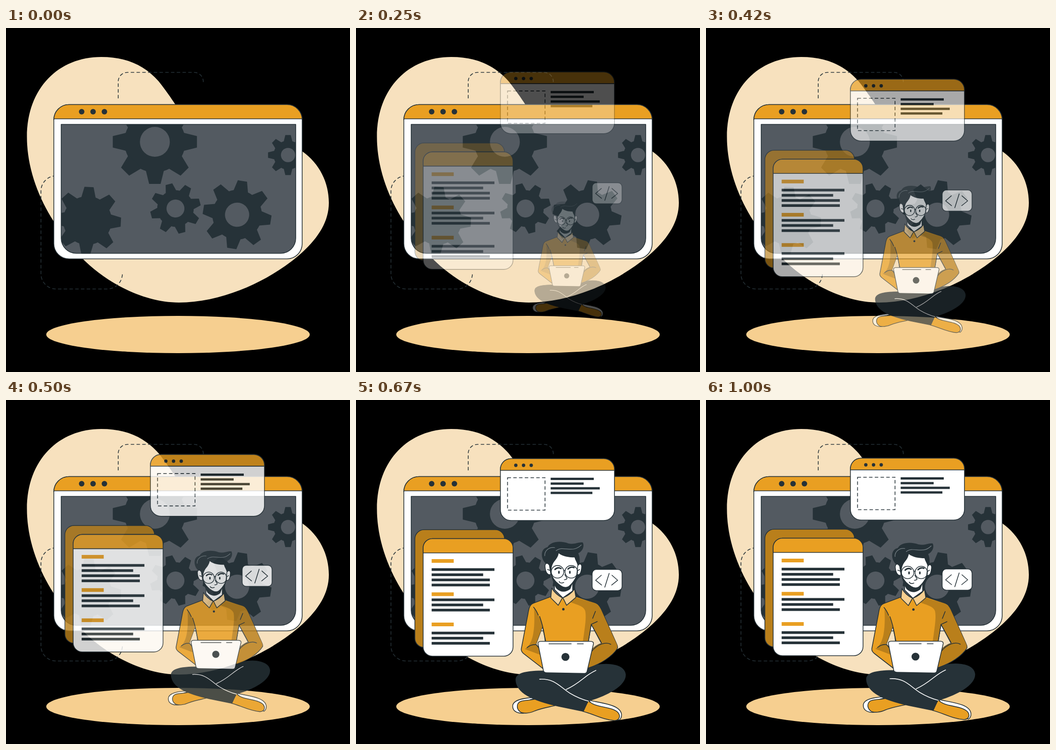
Recreate the animation shown at these times as an HTML page. Size 748 by 748 pixels, loop 1040 ms.

```html
<!DOCTYPE html>
<html lang="en">
<head>
<meta charset="utf-8">
<title>Developer at work</title>
<style>
  html, body { margin: 0; width: 100%; height: 100%; overflow: hidden; background: #000; }
  svg { display: block; width: 100%; height: 100%; }
  .line { fill: none; stroke: #263238; stroke-width: 1.6; stroke-linecap: round; stroke-linejoin: round; }
  .edge { stroke: #263238; stroke-width: 1.6; stroke-linejoin: round; }
  .dash { fill: none; stroke: #263238; stroke-width: 1.6; stroke-dasharray: 7.5 5; }
  .dark { fill: #263238; }
  .white { fill: #fff; }
  .orange { fill: #e99f22; }
  .brown { fill: #b97f1b; }
  .cream { fill: #f6cf90; }
  .light { fill: none; stroke: #fff; stroke-width: 1.6; stroke-linecap: round; }
</style>
</head>
<body>
<svg viewBox="0 0 748 748">
  <clipPath id="screen"><path d="M120 209.5H630V457a33 33 0 0 1-33 33.8H153a33 33 0 0 1-33-33.8Z"/></clipPath>

  <path fill="#f7e1be" d="M207 63C262 63 302 82 332 116C348 136 358 151 368 166C430 240 560 205 644 268C682 295 702 336 702 380C702 420 680 455 644 488C575 550 470 597 376 597C300 597 220 555 168 503C145 480 122 452 104 421C68 365 45.5 300 45.5 237C45.5 130 115 63 207 63Z"/>
  <ellipse class="cream" cx="374" cy="666.5" rx="286.5" ry="40.5"/>
  <path class="dash" d="M244 153V116a20 20 0 0 1 20-19.5H409a20 20 0 0 1 20 20V118"/>
  <path class="dash" d="M109 321.5a33 33 0 0 0-33 33V535a33 33 0 0 0 33 32.5H220a33 33 0 0 0 33-33.5"/>
  <g id="main"></g>
  <g id="panels"></g>

  <g id="man">
    <!-- shoes -->
    <path class="white edge" d="M401 645C368 645 342 650 342 664C342 676 354 680 366 679L380 650Z"/>
    <path class="orange edge" d="M402 644C390 652 372 650 361 653C350 656 349 669 358 676C364 681 380 679 390 674C405 668 420 666 436 662Z"/>
    <path class="white edge" d="M505 651C530 657 573 660 576 681Q577 689 571 694L530 680Z"/>
    <path class="orange edge" d="M505 652C518 668 552 663 568 677C575 685 572 694 561 695C536 693 516 681 493 675Z"/>
    <!-- legs -->
    <path class="dark edge" d="M412 588C375 588 349 592 349 607C350 636 386 652 440 664L494 675L504 653C545 641 585 620 584.5 596C582 576 552 570 520 576L495 586Z"/>
    <path class="light" d="M400 606C432 604 443 622 465 636C480 645 493 650 505 653M457 628C488 614 498 597 521 587"/>

    <!-- sweater, with openings beside the torso -->
    <path class="orange edge" fill-rule="evenodd" d="M425 428L388 442C379 445 377 452 375 465L360.5 541Q360 547 367 552L407 583H500C532 574 557 556 567.5 539Q568 535 566 531L532 455C527 445 524 443 517 441L478 428Z M406 493L392 531L402 542L413 524Z M511 488L533 529Q520 533 509 546L505 524Z"/>
    <path class="brown" d="M477 430L518 442Q527 445 532 456L566 531Q568 536 566 540C555 556 530 573 501 582L509 546Q520 533 533 529L511 488L505 525H493C497 495 501 475 498 459C494 448 480 446 465 440Z"/>
    <path class="brown" d="M388 451Q401 470 406 493L392 531L402 545L405 555L368 541C392 528 389 476 388 451Z"/>
    <path class="line" d="M387 451Q393 458 397 468M400 471Q409 496 412 525M373 538Q383 530 393 532L401 542M520 460L514 475M505 524L511 488L524 482M512 546C525 530 543 525 553 531M511 488L533 528"/>

    <!-- neck and collar -->
    <path class="white edge" d="M432 401V413L450 431L471 416V395Z"/>
    <path class="dark" d="M421 370C427 392 431 403 436 411Q450 424 466 412L471 399L485 365Z"/>
    <path class="cream edge" d="M426 410L424 431L440 447L449 431Q434 424 426 410ZM475 412L478 430L458 447L450 431Q466 425 475 412Z"/>
    <circle class="dark" cx="451" cy="455.5" r="2.6"/>

    <!-- head -->
    <path class="dark" d="M418 371L413 357C401 345 402 325 417 322C424 309 446 308 462 314C475 317 485 310 493 312C497 320 492 331 483 335C488 345 486 357 485 373Z"/>
    <path class="white" d="M425 376C425 364 428 357 433 351C437 346 440 341 441 335C450 342 463 344 475 344C477 352 482 356 482 365C482 382 474 396 462 406Q455 410 447 405C436 398 428 389 425 376Z"/>
    <path class="white edge" d="M421 361C416 353 410 357 412 367C413 377 419 384 424 380ZM482 362C486 355 492 358 490 368C489 378 485 384 480 380Z"/>
    <path fill="none" stroke="#7b858a" stroke-width="1.2" d="M411 341C410 329 421 321 433 323M435 330C451 317 470 337 490 317"/>
    <g class="line">
      <circle cx="438.5" cy="375" r="13.5"/>
      <circle cx="468" cy="375" r="13.5"/>
      <path d="M452 373Q453.5 371 455 373M425 373L417 370M481 373L486 370M454 381L459 389Q458 392 453 392M442 396Q445 401 452 398"/>
      <path stroke-width="3" d="M433 370Q439 364 446 368M461 369Q467 363 474 366"/>
    </g>
    <ellipse class="dark" cx="441.5" cy="376" rx="1.7" ry="3.3"/>
    <ellipse class="dark" cx="465" cy="376" rx="1.7" ry="3.3"/>

    <!-- laptop -->
    <path class="white edge" d="M402 524.5H510Q517 525 515.5 531L502 589Q501 593.5 496 593.5L415 592Q409 592 408 587L397 532Q395 525 402 524.5Z"/>
    <path class="line" d="M420 530H468M481 530H494"/>
    <circle class="dark" cx="455.5" cy="558" r="8.6"/>
  </g>
</svg>
<script>
const $ = id => document.getElementById(id);
const GREY = '#535a61';

const dots = (xs, y, r) => xs.map(x => `<circle class="dark" cx="${x}" cy="${y}" r="${r}"/>`).join('');
const box = (cls, x, y, w, h, r = 0) =>
  `<rect class="${cls}" x="${x}" y="${y}" width="${w}" height="${h}" rx="${r}"/>`;
const bars = (x, h, list) => list.map(([y, right]) => box('dark', x, y - h / 2, right - x, h)).join('');

// A rounded window with an orange title bar
const frame = (x, y, w, h, r, bar) => box('white edge', x, y, w, h, r) +
  `<path class="orange edge" d="M${x} ${y + bar}V${y + r}a${r} ${r} 0 0 1 ${r}-${r}H${x + w - r}a${r} ${r} 0 0 1 ${r} ${r}V${y + bar}Z"/>`;

// Eight tapered teeth around a disc
function gear(x, y, size, turn, hole) {
  let teeth = '';
  for (let i = 0; i < 8; i++)
    teeth += `<path transform="rotate(${i * 45})" d="M-.22-.66L-.136-1H.136L.22-.66Z"/>`;
  return `<g class="dark" transform="translate(${x} ${y}) rotate(${turn}) scale(${size})">
    <circle r=".725"/>${teeth}<circle r="${hole / size}" fill="${GREY}"/></g>`;
}

$('main').innerHTML = frame(104, 166.5, 540, 335.5, 33, 31) + dots([164.5, 189.3, 214], 182, 6) +
  `<path class="edge" fill="${GREY}" d="M120 209.5H630V457a33 33 0 0 1-33 33H153a33 33 0 0 1-33-33Z"/>
  <g clip-path="url(#screen)">` +
  gear(323.7, 247.5, 91.5, 0, 32.5) + gear(368.5, 392.5, 54.8, -15, 19.5) +
  gear(502.5, 406, 74.3, 9, 26.3) + gear(613.3, 276.3, 43.5, 0, 15.5) +
  gear(177, 418.5, 72.8, 2.8, 0) + '</g>';

$('panels').innerHTML =
  frame(314, 126.5, 248, 134.5, 23, 25.5) + dots([347.5, 364.3, 381], 141, 3.7) +
  box('dash', 329.5, 168, 81.5, 70.5) +
  bars(423.3, 5, [[170.5, 517], [180.8, 495], [191, 530], [201, 514]]) +
  box('brown edge', 128, 281, 195, 256, 20) + frame(146, 300.5, 195.5, 255.5, 20, 31) +
  [345, 417.3, 483].map(y => box('orange', 164.5, y, 48, 8)).join('') +
  bars(164.5, 5.8, [[367.7, 301], [379, 276.5], [390.2, 291], [401.3, 291], [433.5, 301],
    [444.6, 276.5], [455.8, 291], [505.7, 301], [516.9, 276.5], [528, 291]]) +
  box('white edge', 513.5, 367.5, 65, 46, 9) +
  '<path class="line" d="M533.5 380L521 391L534 401.5M550.5 376L541 406M556.5 380L569 391L556 401.5"/>';

// Cubic bezier easing that overshoots before it settles
function ease(x) {
  if (x >= 1) return 1;
  const curve = (s, a, b) => 3 * (1 - s) ** 2 * s * a + 3 * (1 - s) * s * s * b + s ** 3;
  let lo = 0, hi = 1;
  for (let i = 0; i < 30; i++) {
    const mid = (lo + hi) / 2;
    if (curve(mid, .36, .5) < x) lo = mid; else hi = mid;
  }
  return curve(lo, -.01, 1.38);
}

const LOOP = 1040, FPS = 24;

function draw(now) {
  const step = Math.floor((now % LOOP + 5) * FPS / 1000);
  const p = step ? ease((step + 1) / FPS) : 0;
  const fade = Math.max(0, Math.min(1, p));
  $('panels').setAttribute('transform', `translate(0 ${44.88 * (p - 1)})`);
  $('man').setAttribute('transform', `translate(463 503) scale(${.5 + p / 2}) translate(-463 -503)`);
  $('panels').setAttribute('opacity', fade);
  $('man').setAttribute('opacity', fade);
}

const start = performance.now();
function tick() {
  draw(performance.now() - start);
  requestAnimationFrame(tick);
}
tick();
</script>
</body>
</html>
```
